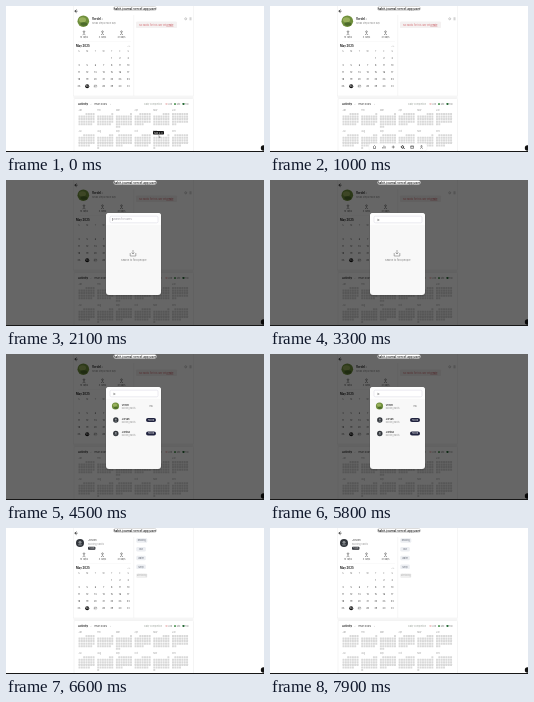
An HTML page for the animation above (8000 ms loop, 258x146 px).

```html
<!DOCTYPE html>
<html lang="en">
<head>
<meta charset="utf-8">
<title>Habit profile</title>
<style>
html, body { margin: 0; width: 100%; height: 100%; overflow: hidden; background: #fff; }
svg { display: block; width: 100vw; height: 100vh; }
text { font-family: Inter, Roboto, sans-serif; }
</style>
</head>
<body>
<svg id="stage" viewBox="0 0 258 146"></svg>
<script>
const NS = 'http://www.w3.org/2000/svg';
const LOOP = 8000;
const stage = document.getElementById('stage');

function el(parent, tag, attrs, str) {
  const node = document.createElementNS(NS, tag);
  for (const key in attrs) node.setAttribute(key, attrs[key]);
  if (str !== undefined) node.textContent = str;
  return parent.appendChild(node);
}
const group = (p, attrs = {}) => el(p, 'g', attrs);
const rect = (p, x, y, w, h, fill, more = {}) => el(p, 'rect', { x, y, width: w, height: h, fill, ...more });
const circle = (p, cx, cy, r, fill, more = {}) => el(p, 'circle', { cx, cy, r, fill, ...more });
const path = (p, d, stroke, width = 0.5, more = {}) =>
  el(p, 'path', { d, stroke, 'stroke-width': width, fill: 'none', ...more });
const text = (p, x, y, size, fill, str, more = {}) => el(p, 'text', { x, y, 'font-size': size, fill, ...more }, str);
const mid = { 'text-anchor': 'middle' };
const bold = { 'font-weight': 700 };
const show = (node, on) => node.setAttribute('visibility', on ? 'inherit' : 'hidden');
const fade = (node, value) => node.setAttribute('opacity', value);
const ramp = (t, a, b) => Math.min(1, Math.max(0, (t - a) / (b - a)));
const easeOut = k => 1 - (1 - k) ** 3;

function leafAvatar(p, x, y, r) {
  circle(p, x, y, r, '#6f8f3c');
  el(p, 'ellipse', { cx: x - r * 0.15, cy: y - r * 0.25, rx: r * 0.62, ry: r * 0.45, fill: '#98b05c' });
  el(p, 'ellipse', { cx: x + r * 0.1, cy: y + r * 0.5, rx: r * 0.6, ry: r * 0.3, fill: '#4d6b2b' });
}

function darkAvatar(p, x, y, r) {
  circle(p, x, y, r, '#30343a');
  circle(p, x, y - r * 0.2, r * 0.38, '#8a8e92');
  rect(p, x - r * 0.5, y + r * 0.25, r, r * 0.4, '#686d72', { rx: r * 0.2 });
}

function drawStats(p) {
  ['12', '4', '31'].forEach((n, i) => {
    const x = [78, 96.5, 115.5][i];
    circle(p, x, 25.7, 0.8, 'none', { stroke: '#333', 'stroke-width': 0.5 });
    path(p, `M${x - 1.3} 28.7Q${x} 26.7 ${x + 1.3} 28.7`, '#333', 0.6);
    text(p, x, 32.2, 2.3, '#555', n + ' days', mid);
  });
}

function drawCalendar(p) {
  text(p, 70, 41, 2.8, '#222', 'May 2025', bold);
  text(p, 121.5, 41, 2.8, '#888', '‹  ›');
  const col = i => 73 + i * 8.2;
  [...'SMTWTFS'].forEach((d, i) => text(p, col(i), 46, 2.2, '#777', d, mid));
  for (let day = 1; day <= 31; day++) {
    const slot = day + 3;
    const x = col(slot % 7), y = 52.3 + Math.floor(slot / 7) * 7;
    const today = day === 26;
    if (today) circle(p, x, y, 2, '#111');
    if (day === 27) circle(p, x, y, 2, '#e4e4e4');
    text(p, x, y + 0.8, 2.3, today ? '#fff' : '#444', day, mid);
  }
}

function drawYear(p) {
  text(p, 72, 99, 2.7, '#222', 'Activity', bold);
  text(p, 84.5, 99, 2.5, '#999', '‹');
  text(p, 88, 99, 2.7, '#333', 'Year 2025');
  text(p, 104, 99, 2.5, '#999', '›');
  text(p, 138, 99, 2.3, '#9aa39a', 'Daily completion');
  ['#f0c9c9', '#5c9f62', '#286b38'].forEach((c, i) => {
    rect(p, 159.5 + i * 8.5, 97, 2, 2, c, { rx: 0.4 });
    text(p, 162.2 + i * 8.5, 98.9, 2, '#777', ['Low', 'Mid', 'Full'][i]);
  });
  for (let m = 0; m < 12; m++) {
    const x = 72.5 + (m % 6) * 18.7, y = m < 6 ? 107 : 128.2;
    const first = new Date(2025, m, 1);
    const days = new Date(2025, m + 1, 0).getDate();
    const name = first.toLocaleString('en', { month: 'short' });
    text(p, x, y - 1.8, 2.1, '#999', name);
    for (let d = 0; d < days; d++) {
      const slot = d + first.getDay();
      rect(p, x + (slot % 7) * 2.35, y + Math.floor(slot / 7) * 2.55, 1.95, 2.1, '#d9d9d9', { rx: 0.3 });
    }
  }
}

function drawPage(p) {
  rect(p, 0, 0, 258, 146, '#fff');
  rect(p, 67.5, -2, 120, 92, '#fff', { stroke: '#eee', 'stroke-width': 0.5 });
  path(p, 'M127.7 9V90', '#eeeeee', 0.5);
  rect(p, 67.5, 90.2, 120, 2.2, '#f5f5f5');
  rect(p, 68, 92.5, 119.5, 56, '#fff', { stroke: '#e9e9e9', 'stroke-width': 0.5, rx: 1 });
  path(p, 'M70.5 3.7L68.8 5.2L70.5 6.7M68.8 5.2H71.5', '#222', 0.7);
  path(p, 'M72 35.5H125', '#f1f1f1', 0.4);
  drawStats(p);
  drawCalendar(p);
  drawYear(p);
  circle(p, 257.5, 142, 2.7, '#111');
}

function drawOwn(p) {
  leafAvatar(p, 77.3, 15.2, 5.8);
  text(p, 86, 14, 2.8, '#222', 'Verdel', bold);
  circle(p, 96.2, 13, 0.5, '#888');
  text(p, 86, 18.3, 2.4, '#888', 'Small steps each day');
  rect(p, 130, 15.5, 41, 6.6, '#f4f1f1', { rx: 1.2 });
  text(p, 133, 19.6, 2.3, '#d66f74', 'No habits for this day yet.');
  text(p, 160.2, 19.6, 2.3, '#c34850', 'Create', { 'text-decoration': 'underline' });
  circle(p, 179.7, 12.8, 1, 'none', { stroke: '#999', 'stroke-width': 0.5 });
  path(p, 'M183.5 11.8H185.5M183.5 12.8H185.5M183.5 13.8H185.5', '#888', 0.4);
}

function drawOther(p) {
  darkAvatar(p, 74, 15, 4);
  text(p, 82, 12.8, 2.6, '#444', 'Jorvan');
  text(p, 82, 16.7, 2.3, '#999', 'Building habits');
  rect(p, 82, 18.8, 7.4, 3, '#22252b', { rx: 0.8 });
  text(p, 85.7, 21, 1.9, '#fff', 'Follow', mid);
  ['Reading', 'Run', 'Water', 'Sleep', 'Stretching'].forEach((label, i) => {
    const y = 10.2 + i * 8.8, w = i % 4 ? 9.5 : 11;
    rect(p, 130.3, y, w, 4.5, i === 4 ? '#f0f0f0' : '#eceef2', { rx: 1.2 });
    text(p, 130.3 + w / 2, y + 3, 2.1, i === 4 ? '#aaa' : '#626976', label, mid);
  });
}

function drawDock(p) {
  rect(p, 99, 137.4, 58, 7.2, '#fff', { rx: 2, stroke: '#ececec', 'stroke-width': 0.4 });
  const icons = [
    'M-1.5 0L0 -1.5L1.5 0M-1 0V1.5H1V0',
    'M-1.3 1.5V0M0 1.5V-1.5M1.3 1.5V-.7',
    'M-1.5 0H1.5M0 -1.5V1.5',
    'M.8 .8L1.8 1.8M1 0A1.2 1.2 0 1 1 1 -.1',
    'M-1.4 -1.1H1.4V1.4H-1.4ZM-1.4 -.3H1.4',
    'M-1.4 1.6Q0 -.5 1.4 1.6M-.7 -.8A.7 .7 0 1 1 .7 -.8A.7 .7 0 1 1 -.7 -.8'
  ];
  icons.forEach((d, i) => path(p, d, i === 3 ? '#111' : '#444', i === 3 ? 0.9 : 0.55,
    { transform: `translate(${104.5 + i * 9.4} 141)` }));
}

function drawEmpty(p) {
  path(p, 'M124.2 73V76H129.8V73M127 70V74M125.6 72.6L127 74L128.4 72.6', '#8a8a8a', 0.7);
  text(p, 127.7, 81, 2.5, '#777', 'Search to find people', mid);
}

function drawResults(p) {
  ['Verdel', 'Jorvan', 'Jomika'].forEach((name, i) => {
    const y = [52, 66, 79.5][i];
    if (i === 0) leafAvatar(p, 109.5, y, 3.6);
    else darkAvatar(p, 109.8, y, 2.7);
    text(p, 115.8, y - 0.4, 2.3, '#333', name, { 'font-weight': 600 });
    text(p, 115.8, y + 2.5, 2, '#999', 'Building habits');
    if (i) rect(p, 140, y - 2, 10, 4, '#20233f', { rx: 2 });
    text(p, 145, y + 0.7, 2, i ? '#fff' : '#555', i ? 'Follow' : 'You', mid);
  });
}

const page = group(stage);
drawPage(page);
const own = group(page);
drawOwn(own);
const other = group(page);
drawOther(other);
const tip = group(page);
rect(tip, 147, 124.9, 11, 3.6, '#151515', { rx: 0.7 });
text(tip, 152.5, 127.5, 2.1, '#fff', 'Nov 3: 0', mid);
path(tip, 'M152.7 129.6L153.5 132L154.4 130.9Z', '#555', 0.4);
const dock = group(page);
drawDock(dock);

const modal = group(stage);
rect(modal, 0, 0, 258, 146, '#000', { opacity: 0.6 });
rect(modal, 99.5, 33.5, 56, 83, '#000', { rx: 3.5, opacity: 0.12 });
rect(modal, 100, 33, 55, 82, '#f8f8f8', { rx: 3 });
path(modal, 'M100 45V36Q100 33 103 33H152Q155 33 155 36V45Z', 'none', 0, { fill: '#fdfdfd' });
const focusBox = rect(modal, 104, 36.2, 48, 6.6, '#fff', { rx: 1.2, stroke: '#d9d6e2', 'stroke-width': 0.5 });
const hint = text(modal, 106.3, 40.4, 2.5, '#99959f', 'Search for users');
const query = text(modal, 107, 40.5, 2.7, '#333', '');
const caret = rect(modal, 106, 38, 0.4, 3, '#444');
const empty = group(modal);
drawEmpty(empty);
const results = group(modal);
drawResults(results);

const loader = group(stage);
rect(loader, 0, 0, 258, 146, '#fff');
const ring = group(loader);
for (let i = 0; i < 10; i++) {
  const a = (i * 30 - 40) * Math.PI / 180;
  circle(ring, 127.2 + 4.6 * Math.cos(a), 71.3 + 4.6 * Math.sin(a), 0.95, i % 3 ? '#3f9a91' : '#86c4b4', { opacity: 0.45 + i * 0.055 });
}
text(loader, 127.5, 80.4, 2.2, '#555', 'Loading', mid);

const bar = group(stage);
rect(bar, 107.5, 0.5, 43, 4, '#fff', { rx: 2, stroke: '#aaa', 'stroke-width': 0.4 });
text(bar, 129, 3.5, 3, '#222', 'habit-journal.vercel.app/user', { ...mid, 'font-weight': 600 });
rect(stage, 0, 145, 258, 1, '#171717');

function render(t) {
  const open = t >= 1100 && t < 5900;
  const arrived = t >= 6200;
  show(own, !arrived);
  show(other, arrived);
  show(tip, t < 400);
  show(dock, t >= 500 && t < 1100);
  dock.setAttribute('transform', `translate(0 ${9 * (1 - easeOut(ramp(t, 500, 900)))})`);
  page.style.filter = open ? 'blur(0.7px)' : 'none';

  show(modal, open);
  fade(modal, t < 1200 ? 0.96 : 1);
  show(focusBox, t >= 2000);
  fade(focusBox, ramp(t, 1900, 2100));
  show(hint, t < 2900);
  query.textContent = t < 2900 ? '' : t < 3300 ? 'j' : 'jo';
  show(caret, t >= 2100 && t < 2600);
  const found = ramp(t, 3900, 4300);
  fade(empty, 1 - found);
  fade(results, found);

  show(loader, t >= 5900 && !arrived);
  ring.setAttribute('transform', `rotate(${(t - 5900) * 0.36} 127.2 71.3)`);
}

const start = performance.now();
function tick() {
  render((performance.now() - start) % LOOP);
  requestAnimationFrame(tick);
}
render(0);
tick();
</script>
</body>
</html>
```
